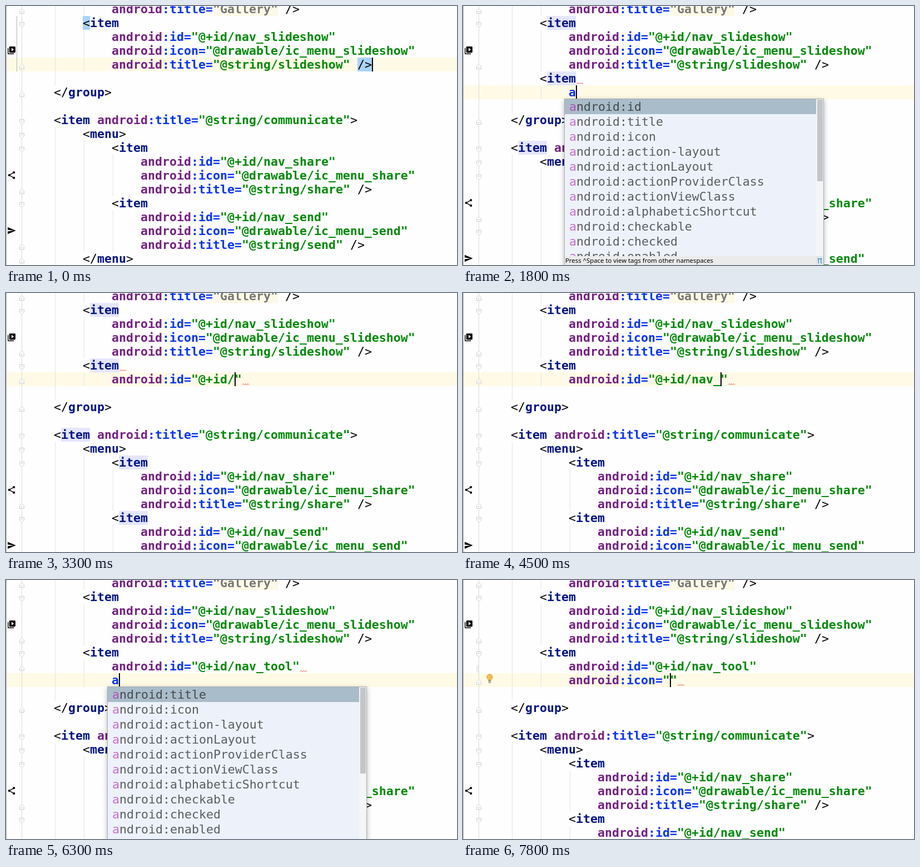
Animation of 811x467 px, one loop 8000 ms. Source, as an HTML page:

```html
<!DOCTYPE html>
<html lang="en">
<head>
<meta charset="utf-8">
<title>Menu editing</title>
<style>
html, body { margin: 0; width: 100%; height: 100%; overflow: hidden; background: #fefefe; }
svg { display: block; width: 811px; height: 467px; }
text { font: 21.593px "DejaVu Sans Mono", monospace; white-space: pre; }
.tag, .ns, .attr, .str, .folded { font-weight: bold; }
.punct { fill: #000; }
.tag { fill: #00148a; }
.ns { fill: #742084; }
.attr { fill: #0433ff; }
.str { fill: #008a06; }
.folded { fill: #777; }
.item { fill: #5a5d60; }
.picked { fill: #45494d; }
.prefix { fill: #cf6bd3; }
.picked .prefix { fill: #b44fbd; }
.hint { font: 11.35px "Noto Sans", "Open Sans", sans-serif; fill: #000; }
.popup { filter: drop-shadow(0 3px 5px rgba(0, 0, 0, .28)); }
</style>
</head>
<body>
<svg id="stage" viewBox="0 0 811 467"></svg>
<script>
const STEP = 300, LOOP = 8000;
const CHAR = 13, LEFT = 34, LINE = 25;
const stage = document.getElementById('stage');

const before = [
  '            android:title="Gallery" />',
  '        <item',
  '            android:id="@+id/nav_slideshow"',
  '            android:icon="@drawable/ic_menu_slideshow"',
  '            android:title="@string/slideshow" />'
];
const entry = name => [
  '            <item',
  `                android:id="@+id/nav_${name}"`,
  `                android:icon="@drawable/ic_menu_${name}"`,
  `                android:title="@string/${name}" />`
];
const after = [
  '', '    </group>', '',
  '    <item android:title="@string/communicate">',
  '        <menu>',
  ...entry('share'), ...entry('send'),
  '        </menu>'
];

const attributes = ['id', 'title', 'icon', 'action-layout', 'actionLayout',
  'actionProviderClass', 'actionViewClass', 'alphabeticShortcut',
  'checkable', 'checked', 'enabled'];
const idValues = ['', '@', '@+', '@+id', '@+id/', '@+id/n', '@+id/na', '@+id/nav',
  '@+id/nav_', '@+id/nav_t', '@+id/nav_to', '@+id/nav_too', '@+id/nav_tool'];

// 24-unit gutter glyphs
const glyphs = {
  slideshow: 'M4 6H2v14c0 1.1.9 2 2 2h14v-2H4V6zm16-4H8c-1.1 0-2 .9-2 2v12c0 1.1.9 2 2 2h12c1.1 0 2-.9 2-2V4c0-1.1-.9-2-2-2zm-8 12.5v-9l6 4.5-6 4.5z',
  send: 'M2 21L23 12 2 3v7l15 2-15 2z'
};

const colX = col => LEFT + col * CHAR;
const rowY = row => row * LINE - 7;
const indentOf = s => s.search(/\S/);
const esc = s => s.replace(/&/g, '&amp;').replace(/</g, '&lt;').replace(/>/g, '&gt;');
const rect = (x, y, w, h, fill, more = '') =>
  `<rect x="${x}" y="${y}" width="${w}" height="${h}" fill="${fill}" ${more}/>`;
const label = (x, y, cls, s) => `<text x="${x}" y="${y}" class="${cls}">${esc(s)}</text>`;
const mark = (row, col, n, fill) => rect(colX(col), rowY(row), n * CHAR, LINE, fill);
const path = (d, stroke, fill = 'none') => `<path d="${d}" stroke="${stroke}" fill="${fill}"/>`;

// Lines typed so far, and where the caret stands
function typed(k) {
  if (k === 0) return { added: [], caret: [4, 48] };
  const pad = ' '.repeat(12);
  const added = [k === 1 ? '' : k === 2 ? '        <' : '        <item'];
  let caret = [5, k === 1 ? 8 : added[0].length];
  if (k >= 5) {
    const n = Math.min(k - 7, idValues.length - 1);
    added.push(k === 5 ? '' : k === 6 ? pad + 'a' : `${pad}android:id="${idValues[n]}"`);
    caret = [6, k === 5 ? 12 : k === 6 ? 13 : added[1].length - 1];
  }
  if (k >= 20) {
    added.push(k === 20 ? '' : k < 23 ? pad + 'a' : pad + 'android:icon=""');
    caret = [7, k === 20 ? 12 : k < 23 ? 13 : 26];
  }
  return { added, caret };
}

function codeLine(s, row, lit) {
  let out = '', last = '';
  for (const m of s.matchAll(/"[^"]*"|<\/?|\/?>|android(?=:)|:\w+=|\w+/g)) {
    const t = m[0];
    let cls = 'attr';
    if (t === '"Gallery"') {
      cls = 'folded';
      out += mark(row, m.index, t.length, '#fcf9e6');
    } else if (t[0] === '"') cls = 'str';
    else if (/[<>]/.test(t)) cls = 'punct';
    else if (t === 'android') cls = 'ns';
    else if (last[0] === '<') {
      cls = 'tag';
      if (lit && t === 'item') out += mark(row, m.index, 4, '#e5e5fd');
    }
    out += label(colX(m.index), rowY(row) + 20, cls, t);
    last = t;
  }
  return out;
}

function guides(lines) {
  const groupEnd = lines.findIndex(s => s.includes('</group'));
  return lines.map((s, row) => {
    let depth = indentOf(s), out = '';
    if (depth < 0) depth = row < groupEnd ? 8 : 0;
    for (let c = 4; c < depth; c += 4) out += rect(colX(c) + 2, rowY(row), 1, LINE, '#e4e4e4');
    return out;
  }).join('');
}

function foldMark(row, open) {
  const y = rowY(row);
  const d = open
    ? `M24.5 ${y + 11.5}h8v5l-4 4l-4 -4z`
    : `M24.5 ${y + 20.5}h8v-5l-4 -4l-4 4z`;
  return path(d, '#cbcbcb', '#fefefe') + path(`M26.5 ${y + (open ? 14.5 : 17.5)}h4`, '#cbcbcb');
}

function folds(lines, k, count) {
  let out = rect(28, 0, 1, 467, '#d9d9d9');
  lines.forEach((s, row) => {
    if (row > 4 && row < 5 + count) return;
    const t = s.trim();
    if (/^<\/|\/>$/.test(t)) out += foldMark(row, false);
    else if (t[0] === '<') out += foldMark(row, true);
  });
  if (k >= 8) out += foldMark(5, true) + foldMark(k < 23 ? 6 : 7, false);
  return out;
}

function gutterIcon(s, row) {
  const m = s.match(/ic_menu_(\w+)/);
  if (!m) return '';
  const shape = m[1] === 'share'
    ? '<path d="M18 5L6 12l12 7" fill="none" stroke="#000" stroke-width="2"/>' +
      [[18, 5], [6, 12], [18, 19]].map(([a, b]) => `<circle cx="${a}" cy="${b}" r="3"/>`).join('')
    : `<path d="${glyphs[m[1]]}"/>`;
  return `<g transform="translate(1.6 ${rowY(row) + 3.6}) scale(.7)">${shape}</g>`;
}

function wave(row, col) {
  return path(`M${colX(col) + 1} ${rowY(row) + 22.5}` + 'l2 -2l2 2'.repeat(3), '#f0473c');
}

const hint = (x, y) => label(x, y, 'hint', 'Press ^Space to view tags from other namespaces');

function tagPopup() {
  return '<g class="popup">' + rect(143.5, 142.5, 290, 43, '#f1f1f1', 'stroke="#a9adb0"') +
    rect(144, 143, 290, 27, '#a9bcc9') + '</g>' +
    label(153, 164, 'picked', 'item') + hint(145, 181);
}

function attrPopup(y, names, picked, thumb) {
  let out = '<g class="popup">' + rect(182.5, y - .5, 466, 300, '#edf2fa', 'stroke="#a9adb0"') + '</g>';
  out += rect(183, y + 27 * picked, 452, 27, '#a9bcc9');
  names.forEach((name, i) => {
    out += `<text x="191" y="${y + 27 * i + 21}" class="${i === picked ? 'picked' : 'item'}">` +
      `<tspan class="prefix">a</tspan>ndroid:${name}</text>`;
  });
  out += rect(635, y, 13, 283, '#f4f5f7') + rect(637, y + 1, 10, thumb, '#c3c5c7', 'rx="1"');
  out += rect(183, y + 283, 465, 16, '#ebebeb') + hint(184, y + 295);
  out += rect(635, y + 283, 13, 16, '#dce6ef');
  return out + `<text x="637" y="${y + 296}" style="font-size:15px" fill="#4a8fc0">π</text>`;
}

function bulb() {
  return '<circle cx="48" cy="175" r="5.2" fill="#f3bd55" stroke="#d9a441"/>' +
    '<path d="M45.5 179h5v3h-5z" fill="#e5ad48"/>' +
    rect(45.5, 181.5, 5, 1.5, '#777') + rect(46, 184, 4, 1.5, '#777');
}

function draw(k) {
  const { added, caret } = typed(k);
  const lines = [...before, ...added, ...after];
  const lit = k >= 4 && k <= 11;
  let out = rect(0, 0, 811, 467, '#fefefe');
  out += rect(0, rowY(caret[0]), 811, LINE, '#fffae6');
  out += guides(lines) + folds(lines, k, added.length);
  if (k === 0) {
    out += rect(19, 18, 1, 100, '#b5b5b5');
    out += mark(1, 8, 1, '#a9d3fb') + mark(4, 46, 2, '#a9d3fb');
  }
  if (k === 2) out += mark(5, 8, 1, '#fbdfdb') + mark(7, 11, 1, '#fbdfdb');
  lines.forEach((s, row) => { out += codeLine(s, row, lit) + gutterIcon(s, row); });
  if (lit) out += wave(5, 13);
  if (k >= 7 && k <= 21) out += wave(6, added[1].length);
  if (k >= 23) out += wave(7, added[2].length);
  if (k === 26) out += rect(24, 154, 4, 13, '#ececec') + bulb();
  out += rect(0, 0, 1, 467, '#a6a6a6');
  out += rect(colX(caret[1]), rowY(caret[0]), 2, LINE, '#000');
  if (k === 2) out += tagPopup();
  if (k === 6) out += attrPopup(168, attributes, 0, 147);
  if (k === 21 || k === 22) out += attrPopup(193, attributes.slice(1), k - 21, 155);
  stage.innerHTML = out;
}

let shown = -1;
function tick() {
  const k = Math.floor(performance.now() % LOOP / STEP);
  if (k !== shown) draw(shown = k);
  requestAnimationFrame(tick);
}
tick();
</script>
</body>
</html>
```
